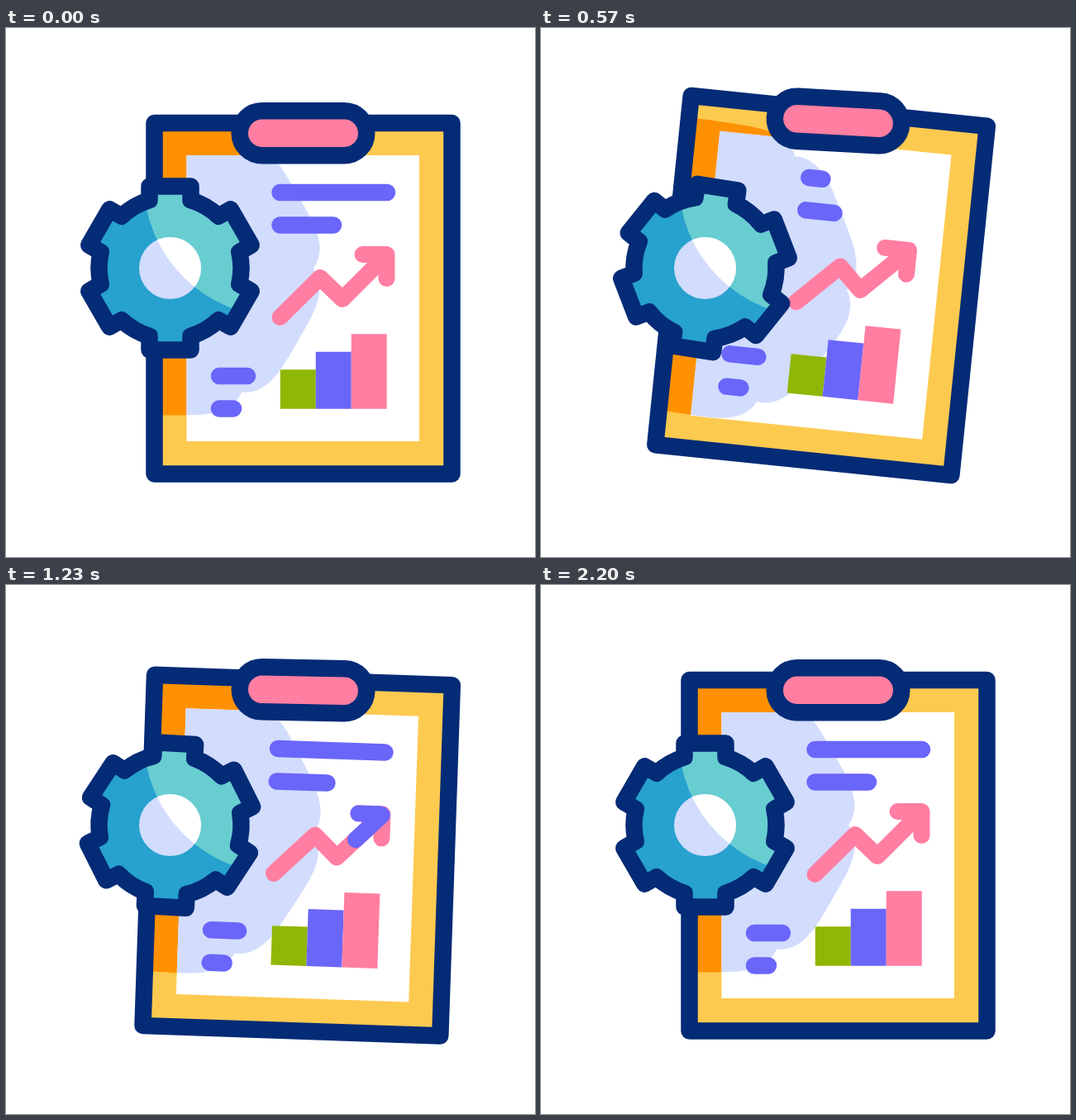
These frames come from a looping animation (640 px wide and 640 px high, 2400 ms). An HTML page with a canvas:

```html
<!DOCTYPE html>
<html lang="en">
<head>
<meta charset="utf-8">
<title>Report and gear</title>
<style>
html, body { margin: 0; height: 100%; overflow: hidden; background: #fff; }
canvas { display: block; width: 100vmin; height: 100vmin; }
</style>
</head>
<body>
<canvas id="stage" width="640" height="640"></canvas>
<script>
const ctx = document.getElementById('stage').getContext('2d');
const LOOP = 2400, STEP = 100 / 3, RAD = Math.PI / 180;
const NAVY = '#042b76', YELLOW = '#fdca50', ORANGE = '#ff9100', LILAC = '#d2dcfd', VIOLET = '#6a66fa',
  PINK = '#ff7ea1', GREEN = '#90b606', TEAL = '#27a1ce', AQUA = '#68cdd0', WHITE = '#fff';
const GEAR = { x: 198.5, y: 290.5 };
const CLIP = { x: 359.5, y: 127.25 };

// Keys are [time, value] pairs.
const DROP = [[0, 0], [330, 19], [675, -25], [980, 0]];
const SWING = [[235, 0], [490, 7.7], [835, -6.8], [1250, 2], [1515, 0]];
const SPIN = [[0, 0], [367, 49], [567, 129], [833, 270.5], [1033, 354.5], [1433, 476.6], [2200, 540]];
const dip = (a, b, c, d, low = 0.1) => [[a, 1], [b, low], [c, low], [d, 1]];
const rise = (a, b) => [[a, 0], [b, 1]];

const LINES = [
  [331.5, 199, 129.5, dip(294, 597, 760, 1036)],
  [331.5, 238.5, 64.5, dip(400, 726, 764, 1319)],
  [258, 421, 34, dip(1200, 1533, 1570, 1900)],
  [258, 460.5, 17, dip(1300, 1633, 1670, 2000)]
];
const BARS = [
  [331.75, 47.5, GREEN, dip(1289, 1620, 1640, 1970, 0)],
  [374.75, 69, VIOLET, dip(1270, 1600, 1640, 1970, 0)],
  [417.75, 90.5, PINK, dip(1313, 1646, 1670, 2000, 0)]
];
const ARROW = [
  { points: [[331.5, 350], [380, 302], [407, 328], [460, 275]], from: rise(924, 1379), to: rise(694, 1149) },
  { points: [[431.5, 274], [460.5, 274], [460.5, 303]], from: rise(1244, 1577), to: rise(1080, 1410) }
];

function tween(t, keys) {
  if (t <= keys[0][0]) return keys[0][1];
  for (let i = 1; i < keys.length; i++) {
    const [t0, v0] = keys[i - 1], [t1, v1] = keys[i];
    if (t < t1) {
      const u = (t - t0) / (t1 - t0);
      return v0 + (v1 - v0) * u * u * (3 - 2 * u);
    }
  }
  return keys[keys.length - 1][1];
}

// Smooth curve through all keys, at rest at both ends.
function spline(t, keys) {
  const last = keys.length - 1;
  if (t >= keys[last][0]) return keys[last][1];
  const span = i => keys[i + 1][0] - keys[i][0];
  const rate = i => (keys[i + 1][1] - keys[i][1]) / span(i);
  const slope = i => i === 0 || i === last ? 0
    : (rate(i - 1) * span(i) + rate(i) * span(i - 1)) / (span(i - 1) + span(i));
  const i = keys.findIndex(k => t < k[0]) - 1, h = span(i), u = (t - keys[i][0]) / h, w = 1 - u;
  return keys[i][1] * w * w * (1 + 2 * u) + keys[i + 1][1] * u * u * (3 - 2 * u)
    + h * u * w * (slope(i) * w - slope(i + 1) * u);
}

function polyline(points) {
  const path = new Path2D();
  points.forEach(([x, y]) => path.lineTo(x, y));
  return path;
}

function rect(x, y, w, h, r = 0) {
  const path = new Path2D();
  path.roundRect(x, y, w, h, r);
  return path;
}

function circle(x, y, r) {
  const path = new Path2D();
  path.arc(x, y, r, 0, 2 * Math.PI);
  return path;
}

function fill(path, color) {
  ctx.fillStyle = color;
  ctx.fill(path);
}

function stroke(path, color, width = 20.5) {
  ctx.strokeStyle = color;
  ctx.lineWidth = width;
  ctx.stroke(path);
}

function scoped(draw) {
  ctx.save();
  draw();
  ctx.restore();
}

const around = (p, angle) => new DOMMatrix().translate(p.x, p.y).rotate(angle);

function placed(path, matrix) {
  const out = new Path2D();
  out.addPath(path, matrix);
  return out;
}

function makeGear() {
  const path = new Path2D(), half = Math.asin(25 / 86), top = Math.atan2(25, 99), tip = Math.hypot(25, 99);
  for (let k = 0; k < 6; k++) {
    const mid = (60 * k - 90) * RAD;
    for (const a of [mid - top, mid + top]) path.lineTo(tip * Math.cos(a), tip * Math.sin(a));
    path.arc(0, 0, 86, mid + half, mid + 60 * RAD - half);
  }
  path.closePath();
  return path;
}

// Six flat-topped lobes with a notch between neighbours.
function makeShade() {
  const points = [];
  for (let a = 0; a < 360; a += 2) {
    const off = a % 60 - 30;
    const r = 178 / Math.cos(off * RAD) - 32 * (off / 30) ** 4;
    points.push([r * Math.cos(a * RAD), r * Math.sin(a * RAD)]);
  }
  return polyline(points);
}

const gearShape = makeGear(), shadeShape = makeShade();
const board = rect(179.5, 115, 360, 424.5), paper = rect(218.5, 154, 281.5, 346);
const clipShape = rect(282.75, 100.25, 153.5, 54, 27);
const hole = circle(GEAR.x, GEAR.y, 37.5), shine = circle(331, 185, 164.5);
const pathLength = points => points.slice(1).reduce(
  (sum, [x, y], i) => sum + Math.hypot(x - points[i][0], y - points[i][1]), 0);
ARROW.forEach(part => {
  part.path = polyline(part.points);
  part.length = pathLength(part.points);
});

function drawArrow(t) {
  ARROW.forEach(part => stroke(part.path, PINK, 20));
  ARROW.forEach(part => {
    const from = tween(t, part.from), to = tween(t, part.to);
    if (to <= from) return;
    scoped(() => {
      ctx.setLineDash([(to - from) * part.length, 2 * part.length]);
      ctx.lineDashOffset = -from * part.length;
      stroke(part.path, VIOLET, 20);
    });
  });
}

function drawBoard(t, spin, drop, swing) {
  const pose = around({ x: CLIP.x, y: CLIP.y + drop }, swing).translate(-CLIP.x, -CLIP.y);
  const shade = placed(shadeShape, pose.inverse().multiply(around(GEAR, spin)));
  ctx.setTransform(pose);
  for (const [area, base, dark] of [[board, YELLOW, ORANGE], [paper, WHITE, LILAC]]) {
    fill(area, base);
    scoped(() => {
      ctx.clip(area);
      fill(shade, dark);
    });
  }
  for (const [x, y, length, keys] of LINES)
    stroke(polyline([[x, y], [x + length * tween(t, keys), y]]), VIOLET);
  for (const [x, height, color, keys] of BARS) {
    const h = height * tween(t, keys);
    fill(rect(x, 460.75 - h, 43, h), color);
  }
  drawArrow(t);
  stroke(board, NAVY);
}

function drawClip(drop, swing) {
  ctx.setTransform(around({ x: CLIP.x, y: CLIP.y + drop }, swing * 0.55).translate(-CLIP.x, -CLIP.y));
  fill(clipShape, PINK);
  stroke(clipShape, NAVY);
}

function drawGear(spin) {
  const gear = placed(gearShape, around(GEAR, spin));
  ctx.resetTransform();
  for (const [area, base, light] of [[gear, TEAL, AQUA], [hole, LILAC, WHITE]]) {
    fill(area, base);
    scoped(() => {
      ctx.clip(area);
      fill(shine, light);
    });
  }
  stroke(gear, NAVY);
}

function render(now) {
  const t = Math.floor((now % LOOP + 4) / STEP) * STEP;
  const spin = spline(t, SPIN), drop = tween(t, DROP), swing = tween(t, SWING);
  ctx.resetTransform();
  ctx.fillStyle = WHITE;
  ctx.fillRect(0, 0, 640, 640);
  ctx.lineCap = ctx.lineJoin = 'round';
  drawBoard(t, spin, drop, swing);
  drawClip(drop, swing);
  drawGear(spin);
}

const start = performance.now();
function tick() {
  render(performance.now() - start);
  requestAnimationFrame(tick);
}
tick();
</script>
</body>
</html>
```
